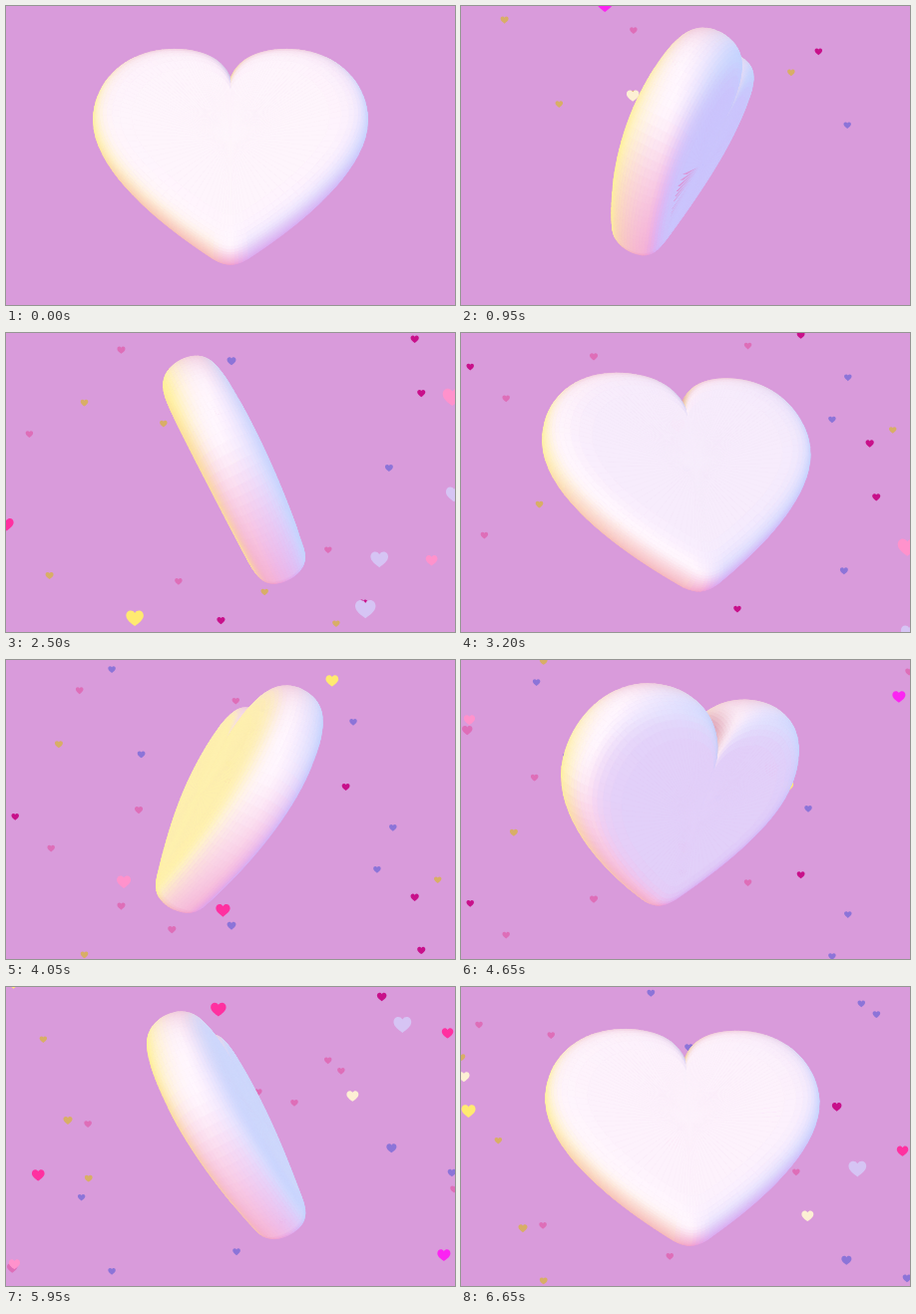
An HTML page with a canvas for the animation above (6700 ms loop, 450 by 300 pixels).

```html
<!DOCTYPE html>
<html>
<head>
<meta charset="utf-8">
<style>
html, body { margin: 0; height: 100%; overflow: hidden; background: #d99bdb; }
canvas { display: block; }
</style>
</head>
<body>
<canvas id="stage" width="450" height="300"></canvas>
<script>
const ctx = document.getElementById('stage').getContext('2d');
const LOOP = 6700, STEP = 50, SPIN = LOOP / 2;
const TILT = 0.47, DEPTH = 28, SHIFT = 8, CAMERA = 600, CX = 225, CY = 150;
const RINGS = 28, SAMPLES = 20, NOTCH = 78;

// Right half of the outline, notch to tip: a chain of cubic curves
const KEYS = [
  [0, NOTCH], [8, 105], [32, 117], [62, 117],
  [108, 117], [139, 84], [139, 40],
  [139, -18], [60, -78], [20, -105],
  [12, -111], [5, -113], [0, -113]
];
function curvePoint(k, t) {
  const u = 1 - t;
  return [0, 1].map(d => u ** 3 * KEYS[k][d] + 3 * u * u * t * KEYS[k + 1][d]
    + 3 * u * t * t * KEYS[k + 2][d] + t ** 3 * KEYS[k + 3][d]);
}
const half = [];
for (let k = 0; k < KEYS.length - 1; k += 3) {
  const n = k < 9 ? SAMPLES : 5;
  for (let i = 0; i < n; i++) half.push(curvePoint(k, i / n));
}
const outline = [...half, KEYS.at(-1), ...half.slice(1).reverse().map(([x, y]) => [-x, y])];

// Blue light from the right, yellow from the left, pink from below and above
function shade(x, y, z, crease) {
  const right = Math.max(0, x), left = Math.max(0, -x);
  const down = Math.max(0, -y) ** 2, up = Math.max(0, y) ** 4;
  const lit = [
    255 - 60 * right ** 1.5 - 14 * down - 17 * up,
    247 - 90 * down - 50 * up - 36 * right * (1 - up) - 6 * left,
    254 - 105 * left ** 2 - 55 * down * (1 - right) - 38 * up
  ];
  const dark = [215, 145, 175];
  return `rgb(${lit.map((c, i) => Math.round(c + (dark[i] - c) * crease))})`;
}

function drawBigHeart(t) {
  const a = 2 * Math.PI * t / SPIN, ca = Math.cos(a), sa = Math.sin(a);
  const ct = Math.cos(TILT), st = Math.sin(TILT);
  const rings = Array.from({ length: RINGS + 1 }, (_, j) => {
    const phi = Math.PI * j / RINGS, rim = Math.abs(Math.sin(phi));
    const s = rim ** .17, Z = SHIFT + DEPTH * Math.cos(phi);
    return outline.map(([X, Y]) => {
      const y = Y * s * ct + Z * st, back = Z * ct - Y * s * st;
      const x = X * s * ca - back * sa, z = X * s * sa + back * ca;
      const k = CAMERA / (CAMERA - z);
      const crease = rim * rim * Math.exp(-(X * X + (Y - NOTCH) ** 2) / 500);
      return { x, y, z, crease, sx: CX + x * k, sy: CY - y * k };
    });
  });
  const faces = [];
  for (let j = 0; j < RINGS; j++) {
    outline.forEach((_, i) => {
      const n = (i + 1) % outline.length;
      const p = rings[j][i], q = rings[j][n], r = rings[j + 1][n], s = rings[j + 1][i];
      const ax = q.x - s.x, ay = q.y - s.y, az = q.z - s.z;
      const bx = r.x - p.x, by = r.y - p.y, bz = r.z - p.z;
      const nx = ay * bz - az * by, ny = az * bx - ax * bz, nz = ax * by - ay * bx;
      if (nz * (CAMERA - p.z) - nx * p.x - ny * p.y <= 0) return;
      const len = Math.hypot(nx, ny, nz);
      faces.push({
        pts: [p, q, r, s],
        z: p.z + q.z + r.z + s.z,
        fill: shade(nx / len, ny / len, nz / len, (p.crease + r.crease) / 2)
      });
    });
  }
  faces.sort((f, g) => f.z - g.z);
  ctx.lineWidth = .8;
  ctx.lineJoin = 'round';
  for (const { pts, fill } of faces) {
    ctx.fillStyle = ctx.strokeStyle = fill;
    ctx.beginPath();
    pts.forEach(p => ctx.lineTo(p.sx, p.sy));
    ctx.closePath();
    ctx.fill();
    ctx.stroke();
  }
}

// Confetti: many small hearts, a few large and faster ones
const SMALL = ['#c8108a', '#8c74d8', '#d8ae66', '#de6eb8'];
const LARGE = ['#fdf0d4', '#ffea70', '#d6c4f4', '#ff30a0', '#ff92cc', '#fb24f2'];
const COUNT = 92;
let seed = 11;
const rnd = () => (seed = seed * 16807 % 2147483647) / 2147483647;
const pick = list => list[Math.floor(rnd() * list.length)];
const confetti = Array.from({ length: COUNT }, (_, i) => {
  const size = 7.5 + 13 * rnd() ** 5;
  return { born: i * LOOP / COUNT, x: rnd() * 450, size, color: pick(size > 10.5 ? LARGE : SMALL) };
});

function drawSmallHeart({ born, x, size, color }, t) {
  const y = (t - born) * (.1 + .006 * size) - size;
  if (t < born || y > 320) return;
  ctx.save();
  ctx.translate(x, y);
  ctx.scale(size / 20, size / 20);
  ctx.fillStyle = color;
  ctx.beginPath();
  ctx.moveTo(0, -6);
  ctx.bezierCurveTo(3, -11, 10, -9, 10, -3);
  ctx.bezierCurveTo(10, 2, 4, 6, 0, 9);
  ctx.bezierCurveTo(-4, 6, -10, 2, -10, -3);
  ctx.bezierCurveTo(-10, -9, -3, -11, 0, -6);
  ctx.fill();
  ctx.restore();
}

let last = -1;
const start = performance.now();
function frame() {
  const t = Math.floor((performance.now() - start) % LOOP / STEP) * STEP;
  if (t !== last) {
    last = t;
    ctx.fillStyle = '#d99bdb';
    ctx.fillRect(0, 0, 450, 300);
    confetti.forEach(c => drawSmallHeart(c, t));
    drawBigHeart(t);
  }
  requestAnimationFrame(frame);
}
frame();
</script>
</body>
</html>
```
